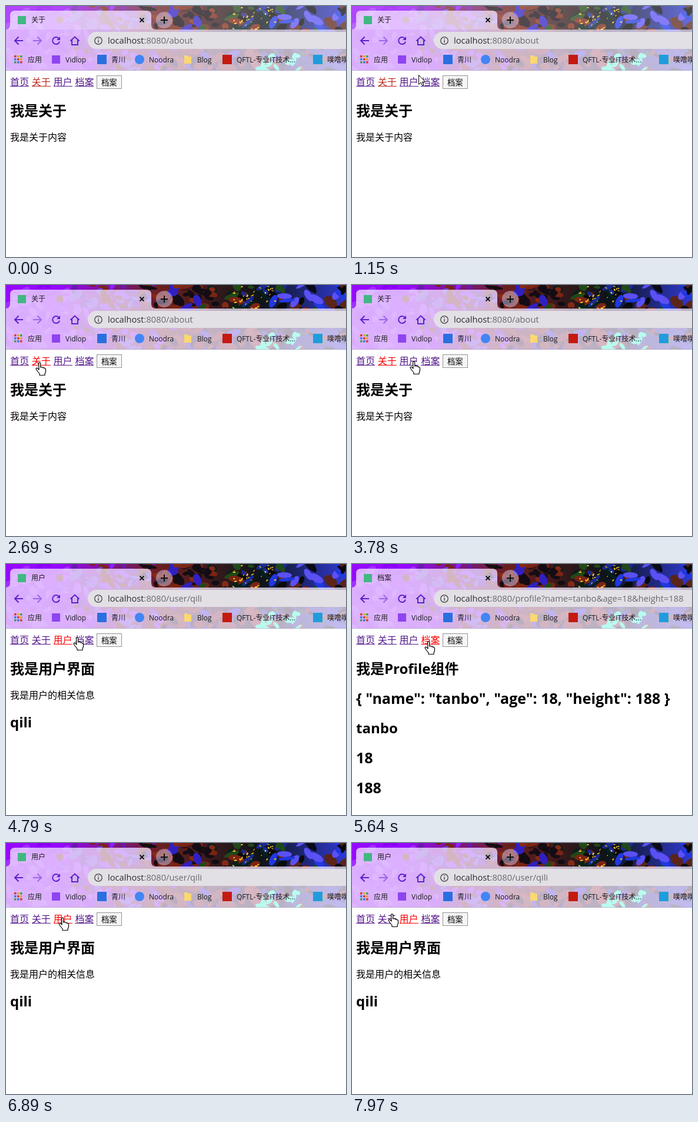
Animation of 578x427 px, one loop 8 s. Source, as an HTML page:

```html
<!DOCTYPE html>
<html lang="zh">
<head>
<meta charset="utf-8">
<title>Router demo</title>
<style>
html, body { margin: 0; width: 100%; height: 100%; overflow: hidden; background: #fff; }
svg { display: block; width: 578px; height: 427px; }
text { font-family: "Open Sans", "Noto Sans CJK SC", "Noto Sans CJK", sans-serif; white-space: pre; }
.small { font-size: 12px; fill: #1c1a20; }
.h { font-size: 24px; font-weight: 700; }
.num { font-size: 25px; font-weight: 700; }
.p { font-size: 16px; }
.icon { fill: none; stroke: #5a22cc; stroke-width: 2; }
</style>
</head>
<body>
<svg viewBox="0 0 578 427">
  <defs>
    <clipPath id="top"><rect width="578" height="110"/></clipPath>
    <linearGradient id="base">
      <stop offset=".15" stop-color="#9608ff"/>
      <stop offset=".45" stop-color="#6a2020"/>
      <stop offset=".75" stop-color="#0c1418"/>
      <stop offset="1" stop-color="#3038d0"/>
    </linearGradient>
  </defs>
  <g clip-path="url(#top)">
    <rect width="578" height="110" fill="url(#base)"/>
    <g id="art"></g>
    <rect id="dim" width="578" height="40" fill="#fff" opacity=".25"/>
    <path d="M-1 40q8 0 8-8V16q0-8 8-8h224q8 0 8 8v16q0 8 8 8H578V110H-1z" fill="#f4eaff" opacity=".74"/>
    <g id="glow"></g>
    <path d="M0 109.5H578" stroke="#a9a2bc" opacity=".6"/>
  </g>

  <rect x="20" y="17" width="14" height="14" fill="#41b883"/>
  <path d="M227.5 20.5l7 7m0-7l-7 7" stroke="#111" stroke-width="1.8"/>
  <circle cx="269" cy="24" r="14" fill="#d8c8e8" opacity=".5"/>
  <path d="M263 24h12m-6-6v12" stroke="#111" stroke-width="2"/>

  <path class="icon" d="M29 59H15m6.5-6.5L15 59l6.5 6.5"/>
  <path class="icon" d="M46 59h14m-6.5-6.5L60 59l-6.5 6.5" opacity=".5"/>
  <path class="icon" d="M90 55.5a6 6 0 1 0 1 5"/>
  <path d="M92 52v6h-6z" fill="#5a22cc"/>
  <path class="icon" d="M109.5 59.5l7.5-7 7.5 7M112 58v8h10v-8"/>
  <rect x="139" y="44" width="460" height="29" rx="14.5" fill="#e2e0e5"/>
  <circle cx="157" cy="59" r="6.2" fill="none" stroke="#555" stroke-width="1.5"/>
  <path d="M157 58v4.5m0-7.5v1.6" stroke="#555" stroke-width="1.6"/>

  <g id="marks"></g>
  <path d="M303 84h5l2 2h5v12h-12z" fill="#fbd870"/>

  <text id="title" class="small" x="43" y="28"></text>
  <text x="173" y="64" font-size="14.7" fill="#2b2b2e">localhost<tspan id="path" fill="#68686c"></tspan></text>

  <g id="nav"></g>
  <rect x="154.5" y="118.5" width="42" height="22" fill="#f6f6f6" stroke="#949494"/>
  <text x="162" y="135" font-size="13.333">档案</text>
  <g id="body"></g>

  <circle id="click" r="12" fill="#ffdc30" opacity=".75"/>
  <path id="arrow" fill="#fff" stroke="#000" d="M.5.5v16l3.7-3.6 2.4 5.6 2.4-1-2.4-5.4h5z"/>
  <path id="hand" fill="#fff" stroke="#000" stroke-width="1.2" stroke-linejoin="round"
    d="M-1.5 2a1.7 1.7 0 0 1 3.2 0v7l1.5-.6 2 .6.6.8 2-.2 1 1.2 1.2.2.5 1.5v4l-1.5 4v2h-9v-2.5l-4-5-2-3.5q.3-2 2.3-1.2l2.7 2.7z"/>
</svg>
<script>
const $ = id => document.getElementById(id);
const LOOP = 8000, WAKE = 1760, STEP = 76.6, HOLD = 70;

function add(parent, tag, attrs, text) {
  const el = document.createElementNS('http://www.w3.org/2000/svg', tag);
  for (const k in attrs) el.setAttribute(k, attrs[k]);
  if (text) el.textContent = text;
  parent.append(el);
  return el;
}

// Paint-splash theme: each band across the width has its own colours
let seed = 11;
const rnd = (a, b) => {
  seed = (seed * 16807) % 2147483647;
  return a + (b - a) * seed / 2147483647;
};
const pick = list => list[Math.floor(rnd(0, list.length))];
const bands = [
  '#9608ff #8a00f4 #a030ff',
  '#8a20ff #6a18b0 #7040d0 #7a2418',
  '#7a2414 #842a16 #140c14 #3020c0',
  '#0a0a0a #06201a #204818 #7a2414 #1a2a90',
  '#0a0a18 #2038e0 #5a50f4 #5a2418 #0a0a0a'
].map(s => s.split(' '));

function splash(id, n, [x0, x1], [y0, y1], size, fill) {
  for (let i = 0; i < n; i++) {
    const x = rnd(x0, x1), y = rnd(y0, y1);
    const band = Math.floor((y > 40 ? x * .8 : x) / 116 + rnd(-.25, .25));
    add($(id), 'ellipse', {
      cx: x, cy: y, rx: size * rnd(.5, 1.6), ry: size * rnd(.3, .8),
      fill: fill || pick(bands[Math.max(0, Math.min(4, band))]),
      transform: `rotate(${rnd(-70, 70)} ${x} ${y})`
    });
  }
}
splash('art', 420, [-5, 585], [-3, 112], 9);
splash('art', 30, [385, 458], [0, 40], 1.8, '#ffc822');
splash('glow', 14, [430, 500], [84, 110], 6, '#b8fcf0');

// Bookmarks: label, text x, then icon x, size, colour, corner
const marks = [
  ['应用', 37], ['Vidlop', 101, 78, 14, '#8e44f0'], ['青川', 179, 155, 16, '#2a6fe0'],
  ['Noodra', 243, 219, 16, '#4285f4', 8], ['Blog', 325],
  ['QFTL-专业IT技术...', 392, 368, 16, '#c41a10'], ['噗噜噗噜', 546, 522, 16, '#209cdc']
];
for (const [label, x, ix, size, fill, rx = 0] of marks) {
  add($('marks'), 'text', { x, y: 96, class: 'small' }, label);
  if (ix) add($('marks'), 'rect', { x: ix, y: 91 - size / 2, width: size, height: size, rx, fill });
}
for (let i = 0; i < 9; i++)
  add($('marks'), 'rect', {
    x: 14 + i % 3 * 5, y: 84 + Math.floor(i / 3) * 5, width: 3.5, height: 3.5,
    fill: ['#d63a2c', '#e8a020', '#38a050', '#3a78e0'][i % 4]
  });

const names = ['首页', '关于', '用户', '档案'];
const linkX = i => 7 + 36.8 * i;
function link(parent, label, i, y) {
  const g = add(parent, 'g', { fill: '#551a8b' });
  add(g, 'text', { x: linkX(i), y, class: 'p' }, label);
  add(g, 'rect', { x: Math.round(linkX(i)), y: y + 1, width: 32, height: 1 });
  return g;
}
const links = names.map((n, i) => link($('nav'), n, i, 135));

// Pages in link order; '#' starts a heading
const pages = [
  ['/home/news', '#我是首页', '我是首页内容'],
  ['/about', '#我是关于', '我是关于内容'],
  ['/user/qili', '#我是用户界面', '我是用户的相关信息', '#qili'],
  ['/profile?name=tanbo&age=18&height=188', '#我是Profile组件',
    '#{ "name": "tanbo", "age": 18, "height": 188 }', '#tanbo', '#18', '#188']
].map(([path, ...lines]) => {
  const view = add($('body'), 'g', {});
  let top = 163;
  for (const line of lines) {
    const head = line[0] === '#';
    const cls = !head ? 'p' : /\d/.test(line) ? 'num' : 'h';
    add(view, 'text', { x: 7, y: Math.round(top + (head ? 23.6 : 15.5)), class: cls }, line.replace('#', ''));
    top += (head ? 31 : 21) + 19.9;
  }
  return { path, view };
});
const home = pages[0].view;
link(home, '新闻', 0, 266).setAttribute('fill', '#f00');
link(home, '消息', 1, 266);
for (let n = 1; n <= 4; n++) {
  add(home, 'text', { x: 47, y: 282 + n * 21, class: 'p' }, '新闻' + n);
  add(home, 'circle', { cx: 35, cy: 276 + n * 21, r: 3 });
}

// Press time and the page it opens
const clicks = [[1760, 0], [2460, 1], [3930, 2], [5570, 3], [6800, 2]];
// First and last step, goal, optional curve handle
const moves = [
  [300, 530, 117, 190],
  [760, 1530, 39, 132, 160, 80],
  [1610, 1610, 28, 128],
  [2160, 2390, 57, 131],
  [3150, 3230, 82, 128],
  [3400, 3470, 105, 129],
  [4080, 4160, 102, 129],
  [4480, 5020, 130, 131, 116, 114],
  [5720, 6030, 54, 19],
  [6340, 6640, 96, 126],
  [7040, 7420, 47, 20, 12, 60],
  [7590, 7970, 68, 120, 88, 70]
];
const bezier = (a, b, c, k) => (1 - k) ** 2 * a + 2 * k * (1 - k) * b + k * k * c;

function pointer(t) {
  let x = 388, y = 444;
  for (const [t0, t1, gx, gy, cx = (x + gx) / 2, cy = (y + gy) / 2] of moves) {
    if (t < t0) break;
    const n = Math.round((t1 - t0) / STEP) + 1;
    const done = t >= t1 ? n : Math.floor((t - t0) / (t1 - t0) * (n - 1) + 1e-6) + 1;
    const k = .5 - .5 * Math.cos(Math.PI * done / n);
    x = bezier(x, cx, gx, k);
    y = bezier(y, cy, gy, k);
  }
  return [Math.round(x), Math.round(y)];
}
const show = (el, on) => el.setAttribute('visibility', on ? 'visible' : 'hidden');

function render(t) {
  const opened = clicks.filter(c => t >= c[0] + HOLD).pop();
  const page = opened ? opened[1] : 1;
  const press = clicks.find(c => t >= c[0] && t < c[0] + HOLD);
  const red = t < WAKE ? '#c0281e' : '#f00';
  pages.forEach((p, i) => show(p.view, i === page));
  links.forEach((l, i) =>
    l.setAttribute('fill', i === page || press && press[1] === i ? red : '#551a8b'));
  $('title').textContent = names[page];
  $('path').textContent = ':8080' + pages[page].path;
  show($('dim'), t < WAKE);

  const [x, y] = pointer(t);
  const over = y >= 119 && y <= 141 && names.some((_, i) => x >= linkX(i) && x < linkX(i) + 32);
  for (const id of ['arrow', 'hand', 'click']) $(id).setAttribute('transform', `translate(${x} ${y})`);
  show($('arrow'), !over);
  show($('hand'), over);
  show($('click'), press);
}

const start = performance.now();
function tick() {
  render((performance.now() - start) % LOOP);
  requestAnimationFrame(tick);
}
tick();
</script>
</body>
</html>
```
